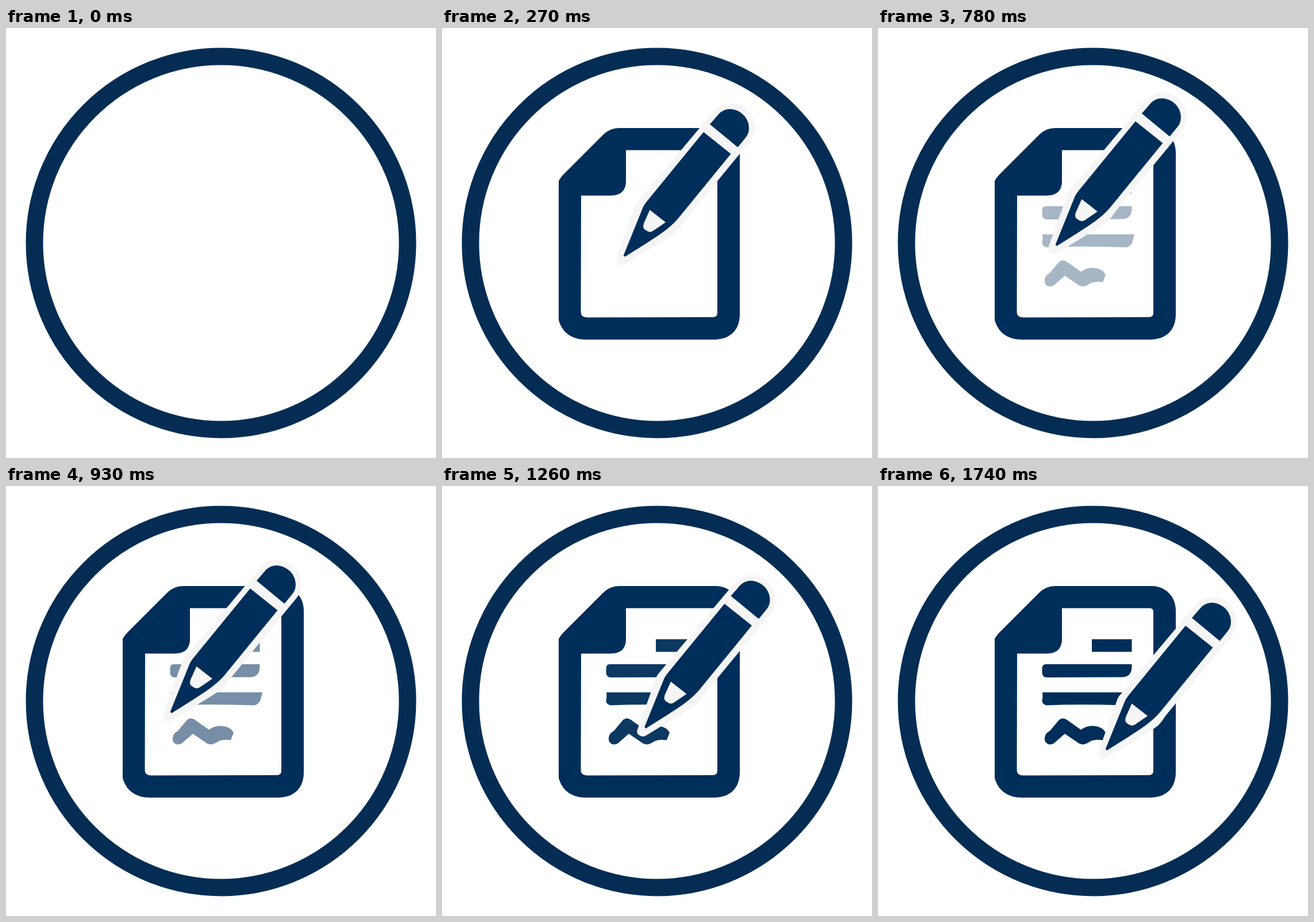
Animation of 748 by 748 pixels, one loop 3810 ms. Source, as an HTML page:

```html
<!DOCTYPE html>
<html lang="en">
<head>
<meta charset="utf-8">
<title>Signing a document</title>
<style>
  html, body { margin: 0; width: 100%; height: 100%; overflow: hidden; background: #fff; }
  svg { display: block; width: 100%; height: 100%; }
  .ink { fill: #002e5a; }
  .halo { fill: #f5f5f5; }
</style>
</head>
<body>
<svg viewBox="0 0 748 748">
  <circle cx="374" cy="374" r="324.5" fill="none" stroke="#052d54" stroke-width="30"/>
  <g id="art" visibility="hidden">
    <path class="ink" fill-rule="evenodd" d="M203 266Q206 260 213 253L280 186Q292 174 308 174H476C500 174 518 192 518 217V498C518 525 502 541 475 542L250 542C226 542 209 530 203 508Z
      M320 212.500H473Q479 212.500 479 219V496Q479 503 471 503L252 503.500Q241.500 503 241.500 494L242 291.500H294C311 291 320 283 320 266Z"/>
    <g id="lines" class="ink">
      <path d="M372 266.500H441.500V288.500H372Z"/>
      <path d="M292 310H441.500V315Q441 332 425 332.500L294 333Q285.500 333 285.500 324V318Q285.500 310 292 310Z"/>
      <path d="M286 359H446L443 371Q440 381 430 381.500Q350 379 293 381.500Q285 380 285.500 372Q287 368 286 359Z"/>
      <path d="M291 434Q293 429 299 426L314 408Q321 401 329 407L353 424Q365 415 380 418Q391 420 396 429L391 442Q375 440 368 445Q358 452 350 448L325 431L309 445Q303 451 296 449Q289 446 290 438Z"/>
    </g>
    <g id="pencil">
      <path class="halo" d="M-14 5Q-13 1 -11 -4L18 -84Q20 -92 27 -99L158 -255Q169 -266 184 -266C208 -266 227 -246 227 -223Q227 -210 219 -200L103 -59Q97 -49 90 -42Q78 -33 46 -14L2 13Q-4 17 -10 13Q-15 10 -14 5Z"/>
      <path class="ink" d="M149 -229.500L165 -248Q173 -256 184 -256C203 -255 217 -240 217 -223Q217 -213 211 -206L197.500 -189.500Z"/>
      <path class="ink" d="M138 -216L185.500 -178L94 -66C78 -47 60 -36 2 .5Q-1 1 -1 -2L33 -86Q35 -90 39 -95Z"/>
      <path class="halo" d="M44.500 -80.500L72 -59L50 -44Q44 -40 38 -45Q31 -48 34 -57Z"/>
    </g>
  </g>
</svg>
<script>
  const LOOP = 3810, STEP = 30;
  const [art, lines, pencil] = ["art", "lines", "pencil"].map(id => document.getElementById(id));

  // Pencil tip as [ms, x, y], joined by straight strokes
  const strokes = [
    [30, 418, 475], [270, 317, 397], [445, 266, 356], [650, 388, 359],
    [863, 260, 390.5], [1172, 384, 407.5], [1440, 291, 448], [1740, 397, 459]
  ];

  const clamp = v => Math.min(1, Math.max(0, v));

  function tipAt(t) {
    let i = 1;
    while (i < strokes.length - 1 && strokes[i][0] < t) i++;
    const [t0, x0, y0] = strokes[i - 1], [t1, x1, y1] = strokes[i];
    const p = clamp((t - t0) / (t1 - t0));
    return [x0 + (x1 - x0) * p, y0 + (y1 - y0) * p];
  }

  function draw(ms) {
    const t = Math.floor((ms % LOOP) / STEP) * STEP;
    art.setAttribute("visibility", t < STEP ? "hidden" : "visible");
    lines.setAttribute("opacity", clamp((t - 507) / 795));
    pencil.setAttribute("transform", `translate(${tipAt(t)})`);
  }

  const start = performance.now();
  function tick() {
    draw(performance.now() - start);
    requestAnimationFrame(tick);
  }
  tick();
</script>
</body>
</html>
```
